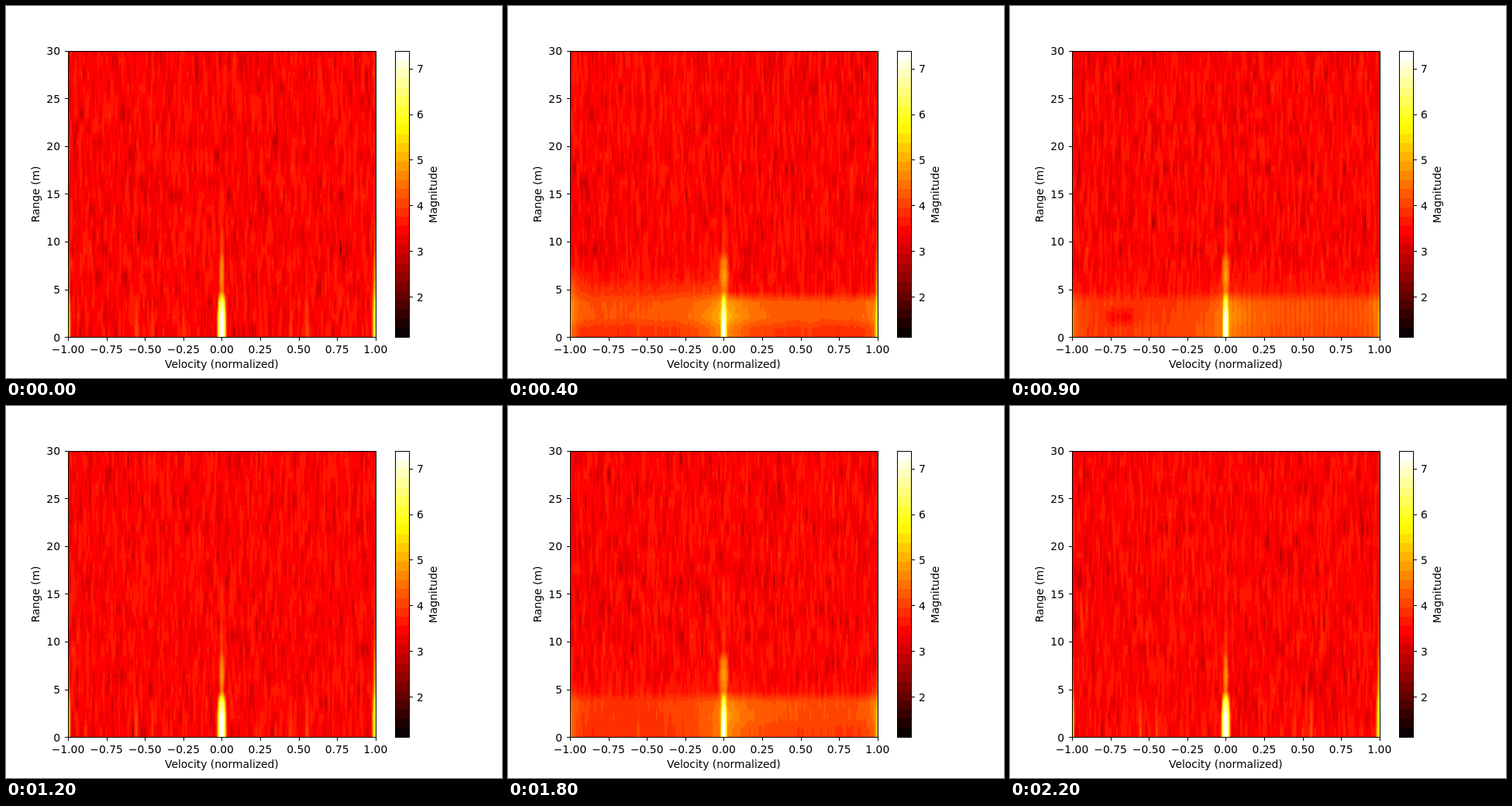
Animation, 640 px wide and 480 px high, one loop 2300 ms. Source, as an HTML page with a canvas:

```html
<!DOCTYPE html>
<html lang="en">
<head>
<meta charset="utf-8">
<title>Range-velocity map</title>
<style>
html, body { margin: 0; width: 100%; height: 100%; overflow: hidden; background: #fff; }
canvas { display: block; width: 640px; height: 480px; }
</style>
</head>
<body>
<canvas id="stage" width="640" height="480"></canvas>
<script>
const ctx = document.getElementById('stage').getContext('2d');
const LOOP = 2300, STEP = 100;
const COLS = 257, MID = 128, ROWS = 22, CELL = 1.41;
const LEFT = 80, TOP = 57.6, W = 396.8, H = 369.6;
const BANDS = 31, LOW = 1.12, HIGH = 7.39;

const clamp = (x, a = 0, b = 1) => Math.min(b, Math.max(a, x));
const lerp = (a, b, t) => a + (b - a) * t;

// "Hot" colour map, one flat colour per contour band
const palette = Array.from({ length: BANDS }, (_, i) => {
  const t = i / (BANDS - 1);
  return [
    0.0416 + t * 0.9584 / 0.365,
    (t - 0.365) / 0.381,
    (t - 0.746) / 0.254
  ].map(c => Math.round(255 * clamp(c)));
});
const packed = new Uint32Array(palette.map(([r, g, b]) =>
  (255 << 24 | b << 16 | g << 8 | r) >>> 0));

// Poses: step, left floor by row, right floor by row, glow, taper, spread,
// left edge, right edge, stripes, hole
const quiet = [[2.5, 2.5, 2.5, 2], [2.5, 2.5, 2.5, 2], 0, 0.09, 0, 5.7, 6.2, 0, 0];
const poses = [
  [0, ...quiet],
  [4, [3.7, 4.08, 4.08, 3.75], [3.75, 4.15, 4.15, 3.1], 0.85, 0.14, 1, 5.5, 5.9, 0, 0],
  [9, [3.92, 3.88, 3.85, 3.3], [4.1, 4.2, 4.2, 3.55], 0.6, 0.14, 0.8, 5.2, 5.1, 1, 1],
  [12, ...quiet],
  [14, [3, 3.15, 3.1, 2.5], [3, 3.15, 3.1, 2.5], 0.95, 0.13, 0.2, 5.6, 6.2, 0, 0],
  [18, [3.75, 3.8, 3.85, 3.3], [3.88, 4.08, 4.08, 3.2], 0.75, 0.14, 1, 5.2, 5.4, 0.2, 0],
  [22, ...quiet]
];

function poseAt(step) {
  const i = Math.max(1, poses.findIndex(p => p[0] >= step));
  const a = poses[i - 1], b = poses[i];
  const t = (step - a[0]) / (b[0] - a[0]);
  return a.map((v, j) => Array.isArray(v)
    ? v.map((x, k) => lerp(x, b[j][k], t))
    : lerp(v, b[j], t));
}

function random(seed) {
  return () => {
    seed = seed + 0x6D2B79F5 | 0;
    let t = Math.imul(seed ^ seed >>> 15, 1 | seed);
    t = t + Math.imul(t ^ t >>> 7, 61 | t) ^ t;
    return ((t ^ t >>> 14) >>> 0) / 4294967296;
  };
}

// Log magnitude of complex noise, correlated between neighbouring cells
function makeSpeckle(seed) {
  const rnd = random(seed), wide = COLS + 2;
  const field = () => Array.from({ length: ROWS + 1 }, () =>
    Float32Array.from({ length: wide }, () =>
      Math.sqrt(-2 * Math.log(1 - rnd())) * Math.cos(2 * Math.PI * rnd())));
  const re = field(), im = field();
  const across = (f, k, c) => 0.5 * f[k][c] + f[k][c + 1] + 0.5 * f[k][c + 2];
  const mix = (f, k, c) => across(f, k, c) + 0.6 * across(f, k + 1, c);
  const power = 2 * 1.5 * 1.36;
  return (k, c) => 0.5 * Math.log10((mix(re, k, c) ** 2 + mix(im, k, c) ** 2) / power + 1e-5);
}

const core = [7.5, 7.4, 6.6, 4.6, 4.9, 4.7, 4, 3.95, 3.75, 3.75, 3.75, 3.65];
const edgeDrop = [0, 0, 0.3, 1, 1.3, 1.5];
const glowFade = [1, 1, 0.8, 0.4, 0.25, 0.25];
const harmonics = [[0.555, 4.15], [0.45, 3.95], [0.25, 3.75]];

function signal(k, c, pose) {
  const [, left, right, glow, taper, spread, edgeL, edgeR, stripes, hole] = pose;
  const v = (c - MID) / MID, d = Math.abs(v);
  const px = d * W / 2, edgePx = W / 2 - px;
  const floor = v < 0 ? left : right;
  let s = k < 4 ? floor[k] : floor[3] - 0.35 * (k - 3);
  if (k < 6) s += glowFade[k] * glow * (Math.exp(-d / 0.12) + 0.35 * Math.exp(-d / 0.45));
  if (k < 5) s += spread * 0.75 * Math.exp(-edgePx / 10);
  if (k < 4) s -= stripes * (v > 0 ? 0.1 : 0.04) * (1 - Math.cos(2 * Math.PI * px / 6.2));
  if (k === 1) s -= hole * 0.75 * Math.exp(-(((v + 0.68) / 0.1) ** 4));

  if (k < 3) {
    for (const [at, level] of harmonics) {
      s = Math.max(s, level - 0.15 * k - 0.1 * ((d - at) * W / 2) ** 2);
    }
  }
  // Zero-velocity return
  if (k < core.length) {
    const slope = k < 3 ? taper : k < 6 ? lerp(0.1, 0.025, spread) : 0.1;
    s = Math.max(s, core[k] - slope * px * px);
  }
  // Wrap-around at both ends
  const drop = k < 6 ? edgeDrop[k] : 1.7 + 0.17 * (k - 5);
  const edge = v < 0 ? edgeL - 0.15 * edgePx ** 2 : edgeR - 0.11 * edgePx ** 2;
  return Math.max(s, edge - drop);
}

function makeGrid(step) {
  const speckle = makeSpeckle(step * 7919 + 41), pose = poseAt(step);
  return Array.from({ length: ROWS }, (_, k) => Float32Array.from({ length: COLS }, (_, c) => {
    const p = speckle(k, c);
    const n = 3.52 + 0.72 * p;
    const s = signal(k, c, pose) + 0.15 * clamp(p, -0.6, 0.3);
    return 0.5 * Math.log10(10 ** (2 * n) + 10 ** (2 * s));
  }));
}

const IW = 396, IH = 368;
const cache = [];

function mapAt(step) {
  if (cache[step]) return cache[step];
  const grid = makeGrid(step);
  const img = ctx.createImageData(IW, IH);
  const out = new Uint32Array(img.data.buffer);
  const scale = BANDS / (HIGH - LOW);
  for (let y = 0; y < IH; y++) {
    const range = 30 * (1 - (y + 59.5 - TOP) / H);
    const r = clamp(range / CELL - 0.5, 0, ROWS - 1.001);
    const k = Math.floor(r);
    const ty = clamp((r - k - 0.5) * 1.2 + 0.5);
    const a = grid[k], b = grid[k + 1];
    for (let x = 0; x < IW; x++) {
      const q = (x + 81.5 - LEFT) / W * (COLS - 1);
      const c = Math.min(COLS - 2, Math.floor(q)), tx = q - c;
      const z = lerp(lerp(a[c], a[c + 1], tx), lerp(b[c], b[c + 1], tx), ty);
      out[y * IW + x] = packed[clamp(Math.floor((z - LOW) * scale), 0, BANDS - 1)];
    }
  }
  return cache[step] = img;
}

function label(text, x, y, align, turn) {
  ctx.save();
  ctx.translate(x, y);
  if (turn) ctx.rotate(-Math.PI / 2);
  ctx.textAlign = align;
  ctx.fillText(text, 0, 0);
  ctx.restore();
}

function frameBox(x0, y0, x1, y1) {
  ctx.strokeStyle = '#000';
  ctx.lineWidth = 1;
  ctx.strokeRect(x0 + 0.5, y0 + 0.5, x1 - x0, y1 - y0);
}

function drawAxes() {
  ctx.fillStyle = '#fff';
  ctx.fillRect(0, 0, 640, 480);

  const band = H / BANDS;
  palette.forEach(([r, g, b], i) => {
    const y0 = Math.round(TOP + H - (i + 1) * band);
    const y1 = Math.round(TOP + H - i * band);
    ctx.fillStyle = `rgb(${r},${g},${b})`;
    ctx.fillRect(502, y0, 19, y1 - y0);
  });

  ctx.fillStyle = '#000';
  ctx.font = '13.89px "DejaVu Sans", sans-serif';
  ctx.textBaseline = 'alphabetic';
  frameBox(80, 58, 477, 427);
  frameBox(502, 58, 520, 427);

  for (let i = 0; i <= 8; i++) {
    const x = LEFT + i * W / 8, v = (i - 4) / 4;
    ctx.fillRect(Math.round(x), 428, 1, 4);
    label((v < 0 ? '\u2212' : '') + Math.abs(v).toFixed(2), x, 448, 'center');
  }
  for (let m = 0; m <= 30; m += 5) {
    const y = TOP + H * (1 - m / 30);
    ctx.fillRect(76, Math.round(y), 4, 1);
    label(String(m), 70, Math.round(y + 5.4), 'right');
  }
  for (let m = 2; m <= 7; m++) {
    const y = TOP + H * (HIGH - m) / (HIGH - LOW);
    ctx.fillRect(521, Math.round(y), 4, 1);
    label(String(m), 530, Math.round(y + 5.4), 'left');
  }
  label('Velocity (normalized)', 278.4, 467, 'center');
  label('Range (m)', 43, 243, 'center', true);
  label('Magnitude', 555.5, 243.5, 'center', true);
}

drawAxes();
const start = performance.now();
let shown = -1;

function tick() {
  const step = Math.floor(((performance.now() - start) % LOOP) / STEP);
  if (step !== shown) {
    ctx.putImageData(mapAt(step), 81, 59);
    shown = step;
  }
  requestAnimationFrame(tick);
}
tick();
</script>
</body>
</html>
```
